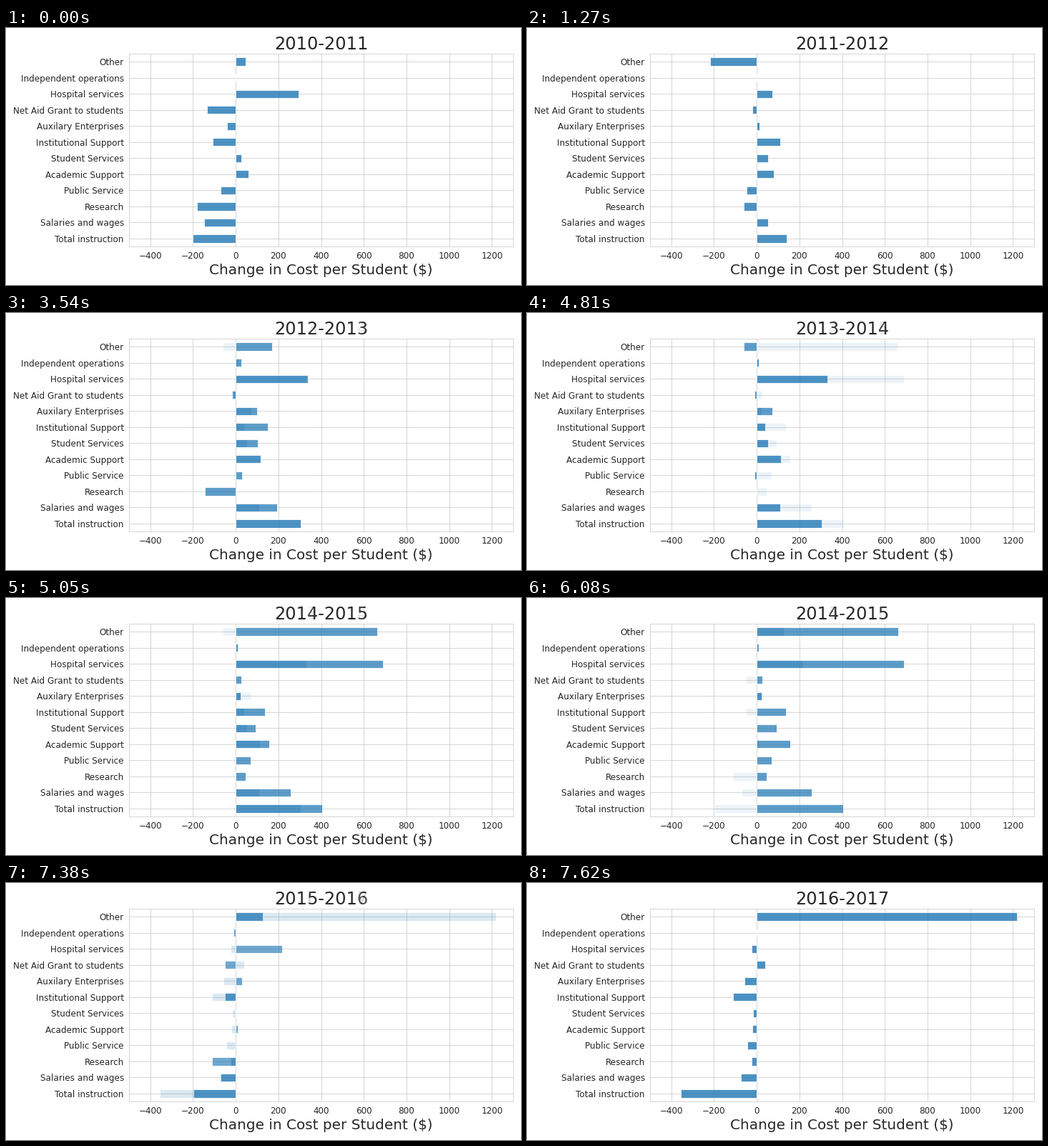
A matplotlib script for the animation above (8 s loop, 720 by 360 pixels).

```python
import matplotlib.pyplot as plt
import numpy as np
from matplotlib.animation import FuncAnimation
from matplotlib.artist import Artist

W, H, DPI = 720, 360, 72
LOOP, TICK = 8000, 10                 # ms
HOLD, STEP, STEPS = 1000, 30, 10      # rest, fade step length, fade steps
PERIOD = HOLD + STEP * (STEPS - 1)
INK, LINE, BLUE = "0.15", "0.8", "#1f77b4"

CATEGORIES = [
    "Other", "Independent operations", "Hospital services",
    "Net Aid Grant to students", "Auxilary Enterprises",
    "Institutional Support", "Student Services", "Academic Support",
    "Public Service", "Research", "Salaries and wages", "Total instruction",
]
CHANGES = {
    2010: [47, 0, 294, -134, -40, -107, 26, 60, -71, -181, -148, -200],
    2011: [-218, 0, 73, -20, 13, 110, 53, 80, -47, -61, 53, 140],
    2012: [170, 26, 338, -17, 100, 150, 103, 117, 30, -144, 194, 304],
    2013: [-61, 10, 331, -10, 73, 40, 53, 113, -10, 0, 110, 304],
    2014: [663, 10, 690, 26, 23, 137, 93, 157, 70, 47, 258, 405],
    2015: [127, -10, 217, -50, 30, -50, 0, 10, 2, -111, -71, -198],
    2016: [1219, 0, -24, 40, -57, -111, -17, -20, -44, -24, -74, -355],
}

plt.rcParams["font.family"] = "DejaVu Sans"
fig = plt.figure(figsize=(W / DPI, H / DPI), dpi=DPI, facecolor="white")


def draw_chart(ax, year):
    ax.clear()
    rows = np.arange(len(CATEGORIES))
    ax.barh(rows, CHANGES[year], height=0.5, color=BLUE, alpha=0.8,
            edgecolor="white", linewidth=1)
    ax.set_xlim(-500, 1300)
    ax.set_ylim(len(CATEGORIES) - 0.5, -0.5)
    ax.set_xticks(range(-400, 1201, 200))
    ax.set_yticks(rows, CATEGORIES)
    ax.tick_params(length=0, pad=7, labelsize=12, labelcolor=INK)
    ax.set_axisbelow(True)
    ax.grid(color=LINE, linewidth=0.8)
    for spine in ax.spines.values():
        spine.set(color=LINE, linewidth=0.8)
    ax.set_xlabel("Change in Cost per Student ($)", fontsize=20, color=INK)
    ax.set_title(f"{year}-{year + 1}", fontsize=24, color=INK)


def render_years():
    left, right, top, bottom = 171.8, 709.2, 35.8, 306.2
    ax = fig.add_axes([left / W, 1 - bottom / H,
                       (right - left) / W, (bottom - top) / H])
    pictures = []
    for year in CHANGES:
        draw_chart(ax, year)
        fig.canvas.draw()
        pictures.append(np.array(fig.canvas.buffer_rgba(), dtype=np.float32))
    ax.remove()
    return pictures


class Picture(Artist):
    """Paints a full-figure RGBA array pixel for pixel."""

    pixels = None

    def draw(self, renderer):
        gc = renderer.new_gc()
        renderer.draw_image(gc, 0, 0, self.pixels)
        gc.restore()


pictures = render_years()
picture = fig.add_artist(Picture())


def update(frame):
    elapsed = frame * TICK - HOLD
    if elapsed < 0:
        mixed = pictures[0]
    else:
        index, phase = divmod(elapsed, PERIOD)
        mix = min((phase // STEP + 1) / STEPS, 1)
        mixed = pictures[index] * (1 - mix) + pictures[index + 1] * mix
    # The renderer expects the bottom row first.
    picture.pixels = np.ascontiguousarray(np.rint(mixed[::-1]).astype(np.uint8))
    return [picture]


anim = FuncAnimation(fig, update, frames=LOOP // TICK, interval=TICK,
                     repeat=True, repeat_delay=0)
plt.show()
```
